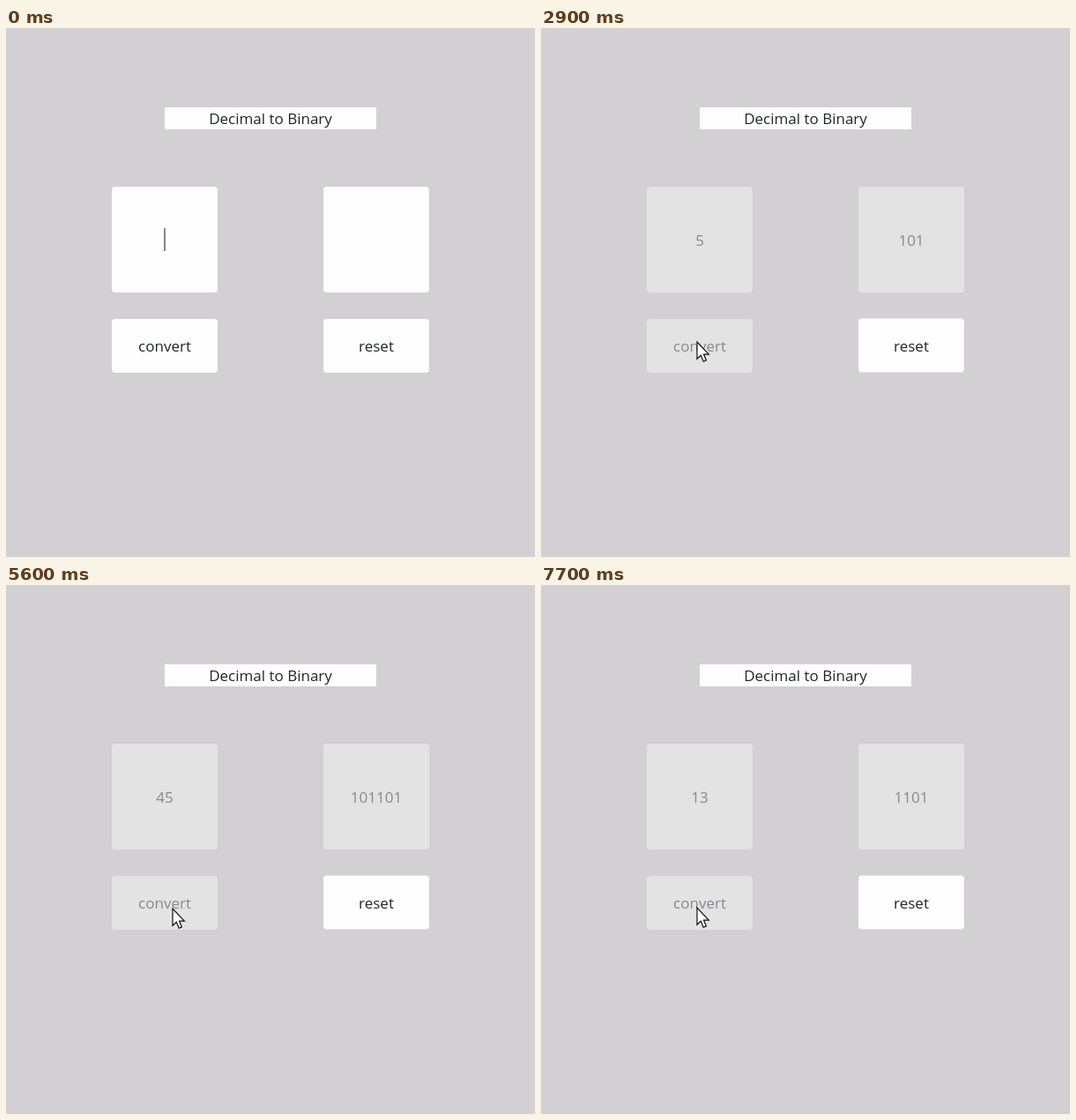
Write an HTML page with a canvas that moves like this. It is 600 px wide and 600 px high and loops after 8 s.

```html
<!DOCTYPE html>
<html lang="en">
<head>
<meta charset="utf-8">
<title>Decimal to Binary</title>
<style>
html, body { margin: 0; width: 100%; height: 100%; overflow: hidden; background: #d2d0d2; }
canvas { display: block; }
</style>
</head>
<body>
<canvas id="stage" width="600" height="600"></canvas>
<script>
const ctx = document.getElementById('stage').getContext('2d');
const LOOP = 8000, STEP = 100, BLINK = 215;

// One number is typed, converted and cleared per round
const rounds = [
  { text: '5', type: 2000, convert: 2600, reset: 4300 },
  { text: '45', type: 4600, convert: 5500, reset: 6400 },
  { text: '13', type: 6900, convert: 7700, reset: LOOP }
];

// Pointer moves: start, end, x, y
const moves = [
  [0, 200, 209, 116], [800, 900, 225, -80], [1200, 1500, 172, 237],
  [2200, 2600, 176, 355], [2900, 3200, 500, 389], [3200, 3400, 437, 362],
  [4200, 4700, 172, 262], [4800, 5000, 172, 269], [5000, 5200, 34, 365],
  [5200, 5500, 178, 365], [5500, 6300, 413, 378], [6300, 6600, 176, 262],
  [7200, 7500, 176, 365]
];

const ease = k => k * k * (3 - 2 * k);

function pointerAt(t) {
  let x = -131, y = 60;
  for (const [from, to, x1, y1] of moves) {
    const k = ease(Math.min(1, Math.max(0, (t - from) / (to - from))));
    x += (x1 - x) * k;
    y += (y1 - y) * k;
  }
  return [Math.round(x), Math.round(y)];
}

function formAt(t) {
  const { text, type, convert } = rounds.find(r => t < r.reset);
  const value = text.slice(0, Math.max(0, Math.floor((t - type) / STEP) + 1));
  const done = t >= convert;
  const sinceKey = t - type - (text.length - 1) * STEP;
  const justTyped = value !== '' && sinceKey <= 300;
  const lit = Math.floor((t + 50) / BLINK) % 2 === 0;
  return { value, done, caret: !done && (justTyped || lit) };
}

function box(x, y, w, h, text, faded, radius = 4) {
  ctx.globalAlpha = faded ? 0.4 : 1;
  ctx.fillStyle = '#fffeff';
  ctx.beginPath();
  ctx.roundRect(x, y, w, h, radius);
  ctx.fill();
  ctx.globalAlpha = faded ? 0.48 : 1;
  ctx.fillStyle = '#212529';
  ctx.fillText(text, x + w / 2, Math.floor(y + h / 2) + 7);
  ctx.globalAlpha = 1;
}

const arrow = new Path2D('M.5 .5V19.8L4.8 15.8L7.7 22.8L10.9 21.4L8.1 14.6H13.8Z');
const beam = new Path2D('M-4 -9.5H-1.5L0 -8.5L1.5 -9.5H4M0 -8.5V8.5M-4 9.5H-1.5L0 8.5L1.5 9.5H4');

function drawPointer(x, y, editable) {
  const overInput = editable && x > 120 && x < 240 && y > 180 && y < 300;
  ctx.save();
  ctx.translate(x + 0.5, y + 0.5);
  ctx.strokeStyle = '#111';
  ctx.fillStyle = '#fff';
  ctx.lineWidth = overInput ? 1.5 : 1.2;
  if (!overInput) ctx.fill(arrow);
  ctx.stroke(overInput ? beam : arrow);
  ctx.restore();
}

function draw(t) {
  const { value, done, caret } = formAt(t);
  ctx.fillStyle = '#d2d0d2';
  ctx.fillRect(0, 0, 600, 600);
  ctx.font = '17px "Open Sans", "Noto Sans", sans-serif';
  ctx.textAlign = 'center';

  box(180, 90, 240, 25, 'Decimal to Binary', false, 0);
  box(120, 180, 120, 120, value, done);
  box(360, 180, 120, 120, done ? Number(value).toString(2) : '', done);
  box(120, 330, 120, 61, 'convert', done);
  box(360, done ? 329.5 : 330, 120, 61, 'reset', false);

  if (caret) {
    ctx.fillStyle = '#85858a';
    ctx.fillRect(Math.round(179 + ctx.measureText(value).width / 2), 227, 2, 26);
  }
  drawPointer(...pointerAt(t), !done);
}

const start = performance.now();
function tick() {
  const t = (performance.now() - start) % LOOP;
  draw(Math.floor(t / STEP) * STEP);
  requestAnimationFrame(tick);
}
tick();
</script>
</body>
</html>
```
